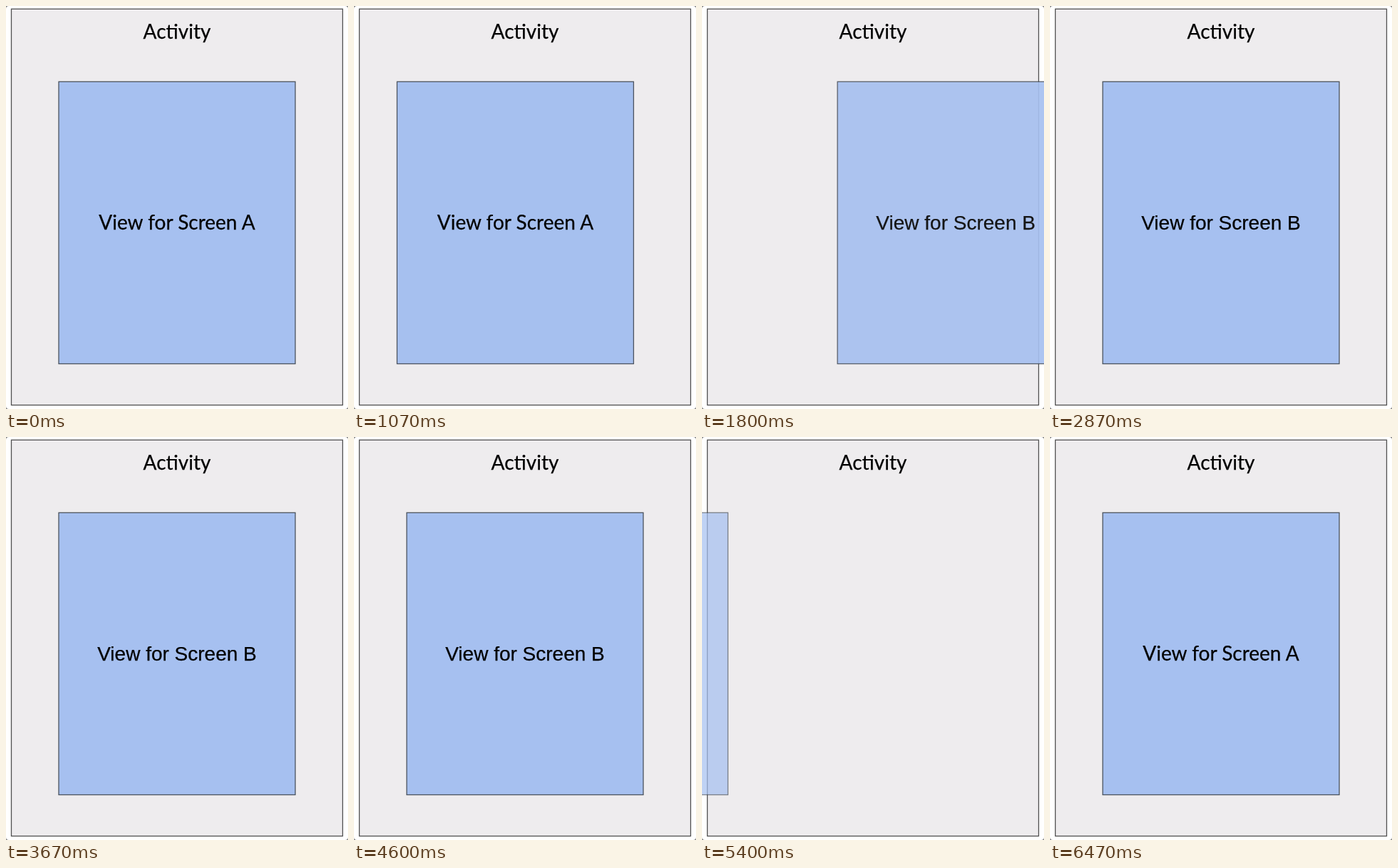
Recreate the animation shown at these times as an HTML page. Size 480 by 566 pixels, loop 6590 ms.

```html
<!DOCTYPE html>
<html lang="en">
<head>
<meta charset="utf-8">
<title>Screen transition</title>
<style>
  html, body { margin: 0; width: 100%; height: 100%; overflow: hidden; background: #fff; }
  svg { display: block; width: 480px; height: 566px; }
  text { font: 28px Lato, sans-serif; text-anchor: middle; fill: #000; stroke: #000; stroke-width: .25px; }
  .arial { font-family: "Liberation Sans", Arial, sans-serif; }
  .frame { fill: #eeecee; stroke: #505050; stroke-width: 1.3px; }
  .view { fill: #a6c0f0; stroke: #4b535f; stroke-width: 1.3px; }
</style>
</head>
<body>
<svg viewBox="0 0 480 566">
  <rect width="480" height="566" fill="#777"/>
  <rect width="480" height="566" rx="4" fill="#fff"/>
  <rect class="frame" x="7.5" y="4.2" width="465" height="556.3"/>
  <text x="240" y="46">Activity</text>
  <g id="a">
    <rect class="view" x="74" y="106.3" width="332" height="396.2"/>
    <text x="240" y="314">View for Screen A</text>
  </g>
  <g id="b">
    <rect class="view" x="74" y="106.3" width="332" height="396.2"/>
    <text class="arial" x="240" y="314">View for Screen B</text>
  </g>
</svg>
<script>
  const LOOP = 6590, STEP = 1000 / 15, LAST = 97;
  const TRAVEL = 407, FADE = 0.32;
  const a = document.getElementById('a');
  const b = document.getElementById('b');

  const progress = (t, start, length) => Math.min(1, Math.max(0, (t - start) / length));
  // Distance from rest, 0 to 1: leaving accelerates, arriving slows down.
  const leave = (t, start, length, power) => progress(t, start, length) ** power;
  const arrive = (t, start) => (1 - progress(t, start, 600)) ** 3;

  function place(view, side, away) {
    view.style.display = away >= 1 ? 'none' : '';
    view.setAttribute('transform', `translate(${(side * away * TRAVEL).toFixed(2)} 0)`);
    view.setAttribute('opacity', 1 - FADE * away);
  }

  function draw(ms) {
    // The picture advances at 15 steps per second.
    const t = Math.min(LAST, Math.floor((ms % LOOP + 4) / STEP)) * STEP;
    place(a, -1, t < 3000 ? leave(t, 868, 330, 6.7) : arrive(t, 5381));
    place(b, 1, t < 3000 ? arrive(t, 1595) : leave(t, 4660, 600, 3));
  }

  const begin = performance.now();
  function tick() {
    draw(performance.now() - begin);
    requestAnimationFrame(tick);
  }
  tick();
</script>
</body>
</html>
```
